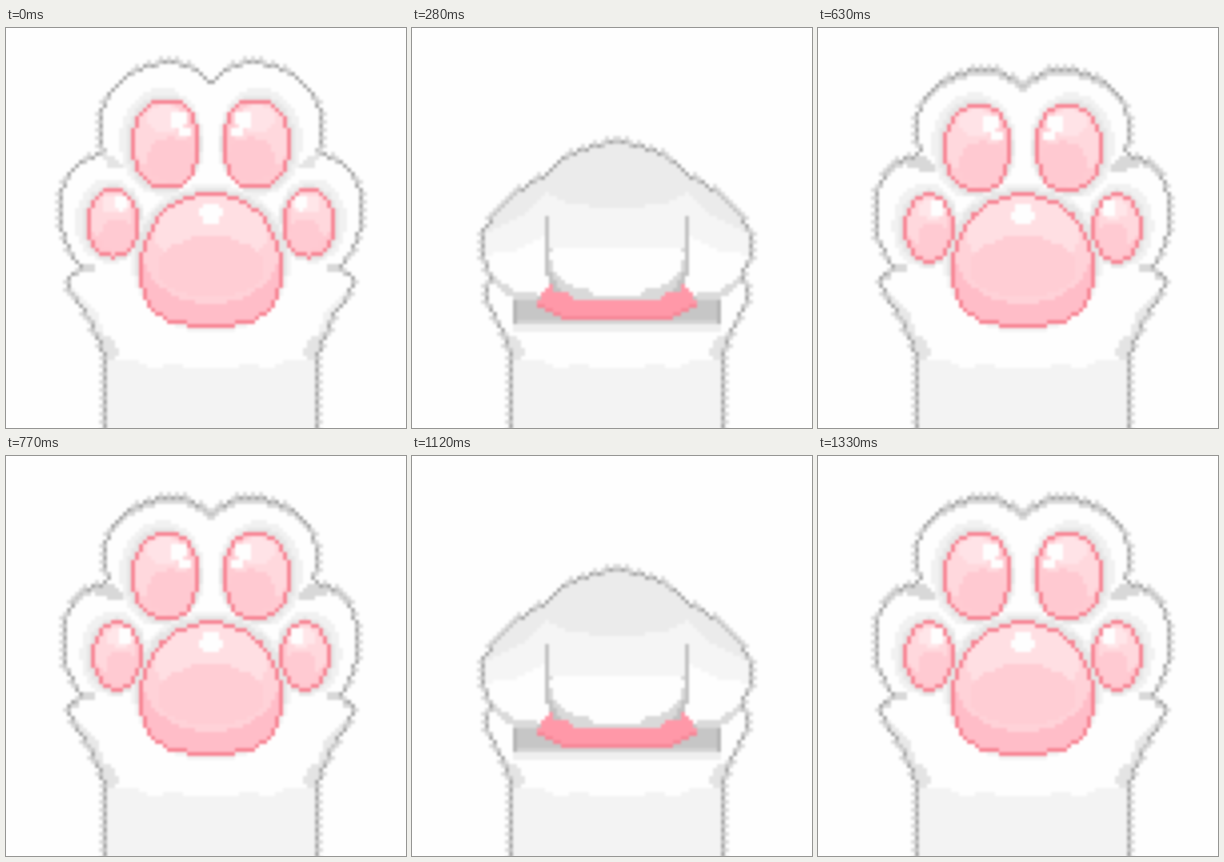
Write an HTML page with a canvas that moves like this. It is 400 by 400 pixels and loops after 1400 ms.

```html
<!DOCTYPE html>
<html lang="en">
<head>
<meta charset="utf-8">
<title>Cat paw</title>
<style>
  html, body { margin: 0; width: 100%; height: 100%; overflow: hidden; background: #fefefe; }
  canvas { display: block; }
</style>
</head>
<body>
<canvas id="stage" width="400" height="400"></canvas>
<script>
const CELLS = 102, STEP = 70;
const WHITE = '#fefefe', ARM = '#f3f3f3', FUR = '#a8a8a8', RECESS = '#c6c6c6', PINK_EDGE = '#f78594';
const stage = document.getElementById('stage').getContext('2d');
const scratch = newCanvas(CELLS).getContext('2d', { willReadFrequently: true });
let ctx;

function newCanvas(size) {
  const canvas = document.createElement('canvas');
  canvas.width = canvas.height = size;
  return canvas;
}

function oval(x, y, rx, ry, tilt = 0) {
  const path = new Path2D();
  path.ellipse(x, y, rx, ry, tilt, 0, 7);
  return path;
}

// Turns a shape and its mirror image about x = 205 into hard 4 px cells.
function raster(shape) {
  const path = typeof shape === 'string' ? new Path2D(shape) : shape;
  scratch.setTransform(1, 0, 0, 1, 0, 0);
  scratch.clearRect(0, 0, CELLS, CELLS);
  for (const [scale, shift] of [[.25, -.25], [-.25, 102.25]]) {
    scratch.setTransform(scale, 0, 0, .25, shift, 0);
    scratch.fill(path);
  }
  const { data } = scratch.getImageData(0, 0, CELLS, CELLS);
  return (x, y) => data[(Math.min(y, CELLS - 1) * CELLS + x) * 4 + 3] > 127;
}

function plot(color, test) {
  ctx.fillStyle = color;
  for (let y = 1; y < CELLS; y++)
    for (let x = 1; x < CELLS - 1; x++)
      if (test(x, y)) ctx.fillRect(x, y, 1, 1);
}

const onRim = (mask, x, y) =>
  [[1, 0], [-1, 0], [0, 1], [0, -1]].some(([dx, dy]) => mask(x + dx, y + dy) !== mask(x, y));

function paint(shape, color, clip = () => true) {
  const mask = raster(shape);
  plot(color, (x, y) => mask(x, y) && clip(x, y));
  return mask;
}

// Dark and light cells take turns along the rim, with faint tips outside.
function furEdge(mask) {
  const odd = (x, y) => (Math.min(x, 101 - x) + y) % 2;
  plot('#c6c6c6', (x, y) => mask(x, y) && onRim(mask, x, y));
  plot(FUR, (x, y) => mask(x, y) && onRim(mask, x, y) && odd(x, y));
  plot('#dcdcdc', (x, y) => !mask(x, y) && onRim(mask, x, y) && odd(x, y));
}

function pad(shape, base, layers) {
  const mask = paint(shape, base);
  for (const [layer, color] of layers) paint(layer, color, mask);
  plot(PINK_EDGE, (x, y) => mask(x, y) && onRim(mask, x, y));
}

function cuff(body) {
  paint('M92 300L110 316 114 326 98 336 92 322Z', '#e4e4e4', body);
  paint('M92 334H122L130 331 140 338 150 342 160 336 172 334 182 340 196 342 205 338V408H92Z', ARM, body);
}

// Spread toes; k grows as they bend.
function openPaw(k) {
  const top = 33 + 7 * k, side = 52 + 4 * k, bent = Math.min(k, 1);
  const body = paint(`M205 ${56 + 2 * k}C198 ${42 + 6 * k} 182 ${top} 165 ${top}
    C128 ${top} ${91 + 6 * k} ${62 + 4 * k} ${91 + 6 * k} 100Q${91 + 5 * k} 114 ${97 + 4 * k} 125
    C75 ${126 + 2 * k} ${side} ${145 + 4 * k} ${side} ${180 + 3 * k}C${side} 208 62 227 77 241
    Q${58 + k} 244 ${61 + k} 258C68 274 84 288 88 306L96 326V408H205Z`, '#d9d9d9');
  const backs = Math.ceil(k * .75) + 1;
  plot(WHITE, (x, y) => body(x, y) && (!k || body(x, y - backs)));
  const halo = k > 2 ? '#d2d2d2' : '#e6e6e6';
  cuff(body);
  paint('M60 254L92 286 98 306 88 302 72 280Z', k ? '#e8e8e8' : '#f1f1f1', body);
  paint(`M${96 - 18 * bent} ${126 + 6 * bent}Q90 125 104 126L120 142 ${102 + 4 * bent} ${139 + 6 * bent}Z`,
    k ? '#d8d8d8' : '#e4e4e4', body);
  paint('M76 237H91V243H76Z', '#d8d8d8', body);

  const toeTop = 70 + 5 * k, toeBottom = 161 + 3 * k;
  const ty = (toeTop + toeBottom) / 2, h = (toeBottom - toeTop) / 2;
  const sx = 107 + 4 * k, sy = 195 + 5 * k, srx = 27 - k;
  const padTop = 164 + k * k;
  paint(oval(156, ty - 2, 42, h + 8), '#f1f1f1', body);
  paint(oval(sx - 3, sy - 2, srx + 8, 43), '#f1f1f1', body);
  paint(oval(158, ty, 38, h + 4), halo, body);
  paint(oval(sx, sy, srx + 4, 39), halo, body);
  paint(oval(205, 231, 80, 74), '#f3f3f3', body);
  paint(oval(205, 231, 76, 70), halo, body);

  pad(`M160 ${toeTop}C138 ${toeTop} 125 ${ty - h * .5} 125 ${ty}C125 ${ty + h * .6} 140 ${toeBottom} 160 ${toeBottom}
    C182 ${toeBottom} 192 ${ty + h * .65} 192 ${ty + h * .2}V${ty - h * .2}C192 ${ty - h * .65} 180 ${toeTop} 160 ${toeTop}Z`,
    '#ffcbd2', [
      [oval(154, ty - 8, 28, h - 9), '#ffd8dd'],
      [oval(165, ty + 16, 24, 23), '#ffc9d1'],
      [oval(160, ty - 25, 19, 14), '#ffe3e7'],
      [oval(172, ty - 25, 9, 9), WHITE],
      [oval(178, ty - 12, 6, 6), WHITE]
    ]);
  pad(oval(sx, sy, srx, 36), '#ffc8d0', [
    [oval(sx - 3, sy - 7, srx - 4, 26), '#ffd8dd'],
    [oval(sx + 4, sy + 12, srx - 10, 17), '#ffcad2'],
    [oval(sx + 3, sy - 19, 14, 10), '#ffe6e9'],
    [oval(sx + 8, sy - 20, 8, 8), WHITE]
  ]);
  pad(`M205 ${padTop}C183 ${padTop} 164 ${padTop + 9} 151 ${padTop + 26}
    C139 ${padTop + 42} 133 222 133 245C133 276 153 298 181 298H205Z`, '#ffbdc8', [
    [oval(205, 223, 67, 52), '#ffd2d8'],
    [oval(205, padTop + 40, 56, 36), '#ffdfe3'],
    [oval(205, 239, 53, 30), '#ffcdd4'],
    [oval(205, padTop + 21, 10, 10), WHITE]
  ]);
  furEdge(body);
}

function halfPaw() {
  const body = paint(`M205 94C188 90 164 94 142 111L120 136C94 146 68 172 67 202
    C67 220 78 236 89 243C75 250 72 264 78 282C83 297 93 308 95 324V408H205Z`, WHITE);
  paint('M96 318H122L112 330 136 338H152L166 332 180 340H205V408H92Z', ARM, body);
  paint('M96 306H205V317H120L98 334Z', '#eeeeee', body);
  paint('M112 298H205V310H112Z', '#d6d6d6', body);
  paint('M128 164C150 158 186 160 204 146H205V304H130C112 300 103 284 103 262L108 238 120 205 131 188Z', RECESS, body);
  paint('M89 243L108 238 104 260 96 250Z', '#dddddd', body);
  paint('M205 94C188 90 164 94 142 111L122 136 132 128 152 116 180 109 201 110V146H205Z', '#ebebeb', body);
  paint('M120 138C94 146 68 172 67 202C67 218 76 234 88 242L90 222C84 198 96 170 120 152Z', '#f0f0f0', body);
  paint('M120 136L125 138 132 162 128 168Z', '#d8d8d8', body);
  paint('M203 98H207V150H203Z', '#d4d4d4');
  paint('M192 92H205V105Z', '#bcbcbc', body);

  pad(oval(128.5, 218, 14.5, 28, .45), '#ffc1cb', [
    [oval(127, 211, 9, 19, .45), '#ffd9de'],
    [oval(131, 203, 6, 8, .4), '#ffeaed']
  ]);
  pad(oval(172.5, 177, 29, 20, -.3), '#ffc4cd', [
    [oval(172, 173, 23, 12, -.3), '#ffd8dd'],
    [oval(175, 168, 14, 6, -.3), '#ffebee']
  ]);
  pad(`M205 196C180 196 165 199 152 208C138 218 134 235 134 255
    C134 281 143 297 158 297H205Z`, '#ffbec9', [
    [oval(205, 232, 62, 32), '#ffcdd4'],
    [oval(205, 218, 55, 20), '#ffe0e4'],
    [oval(205, 248, 52, 29), '#ffcdd4'],
    [oval(205, 258, 42, 24), '#ffc1cb']
  ]);
  furEdge(body);
}

// Closed fist; d lowers the knuckles.
function fist(d) {
  const y = v => v + d;
  const body = paint(`M205 ${y(113)}C172 ${y(113)} 150 ${y(128)} 130 ${y(148)}
    C112 ${y(156)} 82 ${y(174)} 69 ${y(206)}C64 ${y(220)} 71 ${y(236)} 79 ${y(249)}
    C71 260 72 274 78 284C86 296 94 308 96 326V408H205Z`, WHITE);
  cuff(body);
  paint(`M102 ${y(296)}H205V${y(303)}H102Z`, '#efefef', body);
  paint(`M102 ${y(266)}H205V${y(296)}H102Z`, RECESS, body);
  paint(`M102 ${y(290)}H205V${y(296)}H102Z`, '#d3d3d3', body);
  paint(`M102 ${y(264)}H106V${y(298)}H102Z`, '#b4b4b4', body);

  // Side toes, then the two middle toes
  paint(`M70 ${y(206)}L136 ${y(190)} 138 ${y(250)} 126 ${y(270)} 104 ${y(268)} 80 ${y(250)}Z`, WHITE, body);
  paint(`M80 ${y(246)}L104 ${y(264)} 128 ${y(266)} 126 ${y(272)} 102 ${y(272)} 80 ${y(254)}Z`, '#dadada', body);
  paint(`M205 ${y(110)}H150L60 ${y(170)}V${y(236)}L82 ${y(226)} 106 ${y(222)} 134 ${y(206)} 140 ${y(222)}H205Z`, '#f5f5f5', body);
  paint(`M205 ${y(110)}H150L60 ${y(170)}V${y(212)}L88 ${y(198)} 116 ${y(184)} 136 ${y(164)}
    C146 ${y(174)} 168 ${y(180)} 205 ${y(179)}Z`, '#ebebeb', body);
  const strip = paint(`M137 ${y(257)}L123 ${y(277)} 148 ${y(290)}H205V${y(271)}H172Z`, '#ff98a8', body);
  plot('#f78898', (cx, cy) => strip(cx, cy) && !strip(cx, cy + 1));
  paint(`M134 ${y(232)}C136 ${y(252)} 146 ${y(264)} 168 ${y(272)}H205V${y(222)}H134Z`, '#d9d9d9', body);
  paint(`M138 ${y(222)}C138 ${y(246)} 148 ${y(258)} 174 ${y(261)}L184 ${y(267)}H205V${y(222)}Z`, WHITE, body);
  paint(`M133 ${y(190)}H137V${y(238)}L146 ${y(258)} 150 ${y(264)} 142 ${y(262)} 133 ${y(242)}Z`, '#c2c2c2', body);
  furEdge(body);
}

// Draws a pose on the cell grid, then enlarges it with slightly soft edges.
function render(draw) {
  const cells = newCanvas(CELLS);
  ctx = cells.getContext('2d');
  ctx.fillStyle = WHITE;
  ctx.fillRect(0, 0, CELLS, CELLS);
  draw();
  const full = newCanvas(400), out = full.getContext('2d');
  out.fillStyle = WHITE;
  out.fillRect(0, 0, 400, 400);
  out.imageSmoothingEnabled = false;
  out.filter = 'blur(1.2px)';
  out.drawImage(cells, 1, 0, 4 * CELLS, 4 * CELLS);
  return full;
}

const poses = [
  () => openPaw(0), () => openPaw(1), () => openPaw(4), halfPaw, () => fist(0), () => fist(7)
].map(render);

// Close and open again, twice per 1400 ms.
function frame() {
  const step = Math.floor(performance.now() / STEP) % 10;
  stage.drawImage(poses[Math.min(step, 10 - step)], 0, 0);
  requestAnimationFrame(frame);
}
frame();
</script>
</body>
</html>
```
